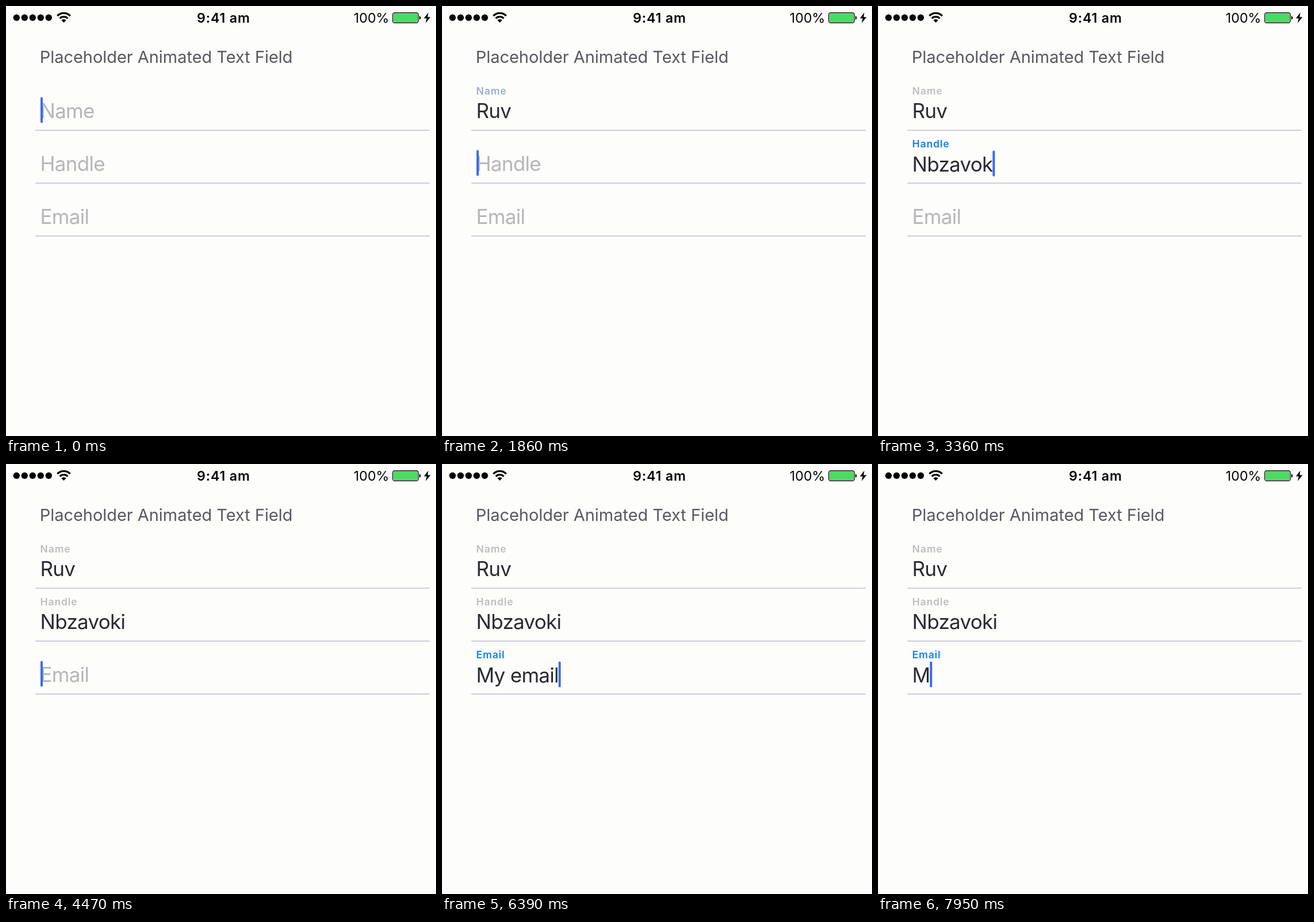
These frames come from a looping animation (748x748 px, 8 s). An HTML page:

```html
<!DOCTYPE html>
<html lang="en">
<head>
<meta charset="utf-8">
<title>Placeholder Animated Text Field</title>
<style>
  html, body { margin: 0; width: 100%; height: 100%; overflow: hidden; background: #fdfdfc; }
  svg { display: block; width: 100%; height: 100%; }
  text { font-family: Inter, Roboto, sans-serif; font-optical-sizing: none; }
  .status { font-size: 23.3px; fill: #050505; }
  .title { font-size: 29px; letter-spacing: -.04px; fill: #58585f; }
  .value, .hint { font-size: 35px; letter-spacing: -.7px; }
  .value { fill: #2a2a30; }
  .hint { fill: #b6b6b9; }
  .caption { font-size: 17.5px; font-weight: 600; letter-spacing: .9px; }
  .rule { fill: #cbcbd0; }
  .caret { fill: #3a6cf2; }
</style>
</head>
<body>
<svg id="stage" viewBox="0 0 748 748">
  <g id="signal"></g>
  <g fill="none" stroke="#000" stroke-width="3.2">
    <path d="M89.3 17.2a15.6 15.6 0 0 1 22.4 0M93.6 21.6a9.6 9.6 0 0 1 13.8 0"/>
    <path d="M100.5 29l-4.2-4.4a6 6 0 0 1 8.4 0z" fill="#000" stroke="none"/>
  </g>
  <text class="status" x="378.4" y="29" text-anchor="middle" font-weight="600" letter-spacing=".8">9:41 am</text>
  <text class="status" x="666.5" y="29" text-anchor="end">100%</text>
  <rect x="672.7" y="11.7" width="44.6" height="17.6" rx="3.5" fill="none" stroke="#111" stroke-width="1.4"/>
  <rect x="674" y="13" width="42" height="15" rx="2" fill="#4cd964"/>
  <path d="M719 17.2q2.4 .6 2.4 3.3t-2.4 3.3z"/>
  <path d="M734.6 11.5L727 21.6h4.8L730 29.8l8.4-10.6h-5z"/>
  <text class="title" x="58.7" y="99">Placeholder Animated Text Field</text>
</svg>
<script>
const LOOP = 8000, LEFT = 59.5, FADE = 300;
const BLUE = [15, 127, 245], GREY = [190, 190, 190];
const stage = document.getElementById('stage');

// keys: times at which one letter is typed; erase: times of one backspace each
const fields = [
  { label: 'Name', text: 'Ruv', focus: -1000, blur: 1740, keys: [300, 540, 780], erase: [] },
  { label: 'Handle', text: 'Nbzavoki', focus: 1740, blur: 3960,
    keys: [2040, 2310, 2580, 2940, 3060, 3180, 3300, 3420], erase: [] },
  { label: 'Email', text: 'My\u00a0email', focus: 3960, blur: 9000,
    keys: [4590, 5040, 5400, 5640, 5790, 5940, 6090, 6240],
    erase: [6690, 6870, 7020, 7170, 7320, 7530, 7710] }
];

function add(tag, attrs, parent = stage) {
  const el = document.createElementNS('http://www.w3.org/2000/svg', tag);
  for (const k in attrs) el.setAttribute(k, attrs[k]);
  return parent.appendChild(el);
}

for (let i = 0; i < 5; i++)
  add('circle', { cx: 18.3 + 14 * i, cy: 20.3, r: 5.7 }, document.getElementById('signal'));

fields.forEach((f, i) => {
  f.y = 195 + 92 * i;
  add('rect', { class: 'rule', x: 51, y: f.y + 20.2, width: 686, height: 1.8 });
  f.hint = add('text', { class: 'hint', x: LEFT, y: f.y });
  f.hint.textContent = f.label;
  f.value = add('text', { class: 'value', x: LEFT });
  f.caption = add('text', { class: 'caption', x: LEFT });
  f.caption.textContent = f.label;
});
const caret = add('rect', { class: 'caret', width: 4, height: 45, rx: 2 });

// Eased progress from 0 to 1 after a start time
function ease(t, start) {
  const p = Math.min(1, Math.max(0, (t - start) / FADE));
  return 1 - (1 - p) ** 3;
}
const count = (times, t) => times.filter(k => k <= t).length;

function draw(t) {
  for (const f of fields) {
    const typed = f.text.slice(0, count(f.keys, t) - count(f.erase, t));
    const active = t >= f.focus && t < f.blur;
    const rise = ease(t, f.keys[0]), dim = ease(t, f.blur);

    f.hint.style.opacity = typed ? 0 : 1;
    f.value.textContent = typed;
    f.value.setAttribute('y', f.y + (active ? 1 : 0));
    f.caption.setAttribute('y', f.y - 41.5 + 14 * (1 - rise));
    f.caption.style.opacity = rise;
    f.caption.style.fill = `rgb(${BLUE.map((c, j) => Math.round(c + (GREY[j] - c) * dim))})`;

    if (active) {
      caret.setAttribute('x', typed ? LEFT - .2 + f.value.getComputedTextLength() : 60);
      caret.setAttribute('y', f.y - (typed ? 35.5 : 36.5));
    }
  }
}

function tick() {
  draw(performance.now() % LOOP);
  requestAnimationFrame(tick);
}
tick();
</script>
</body>
</html>
```
